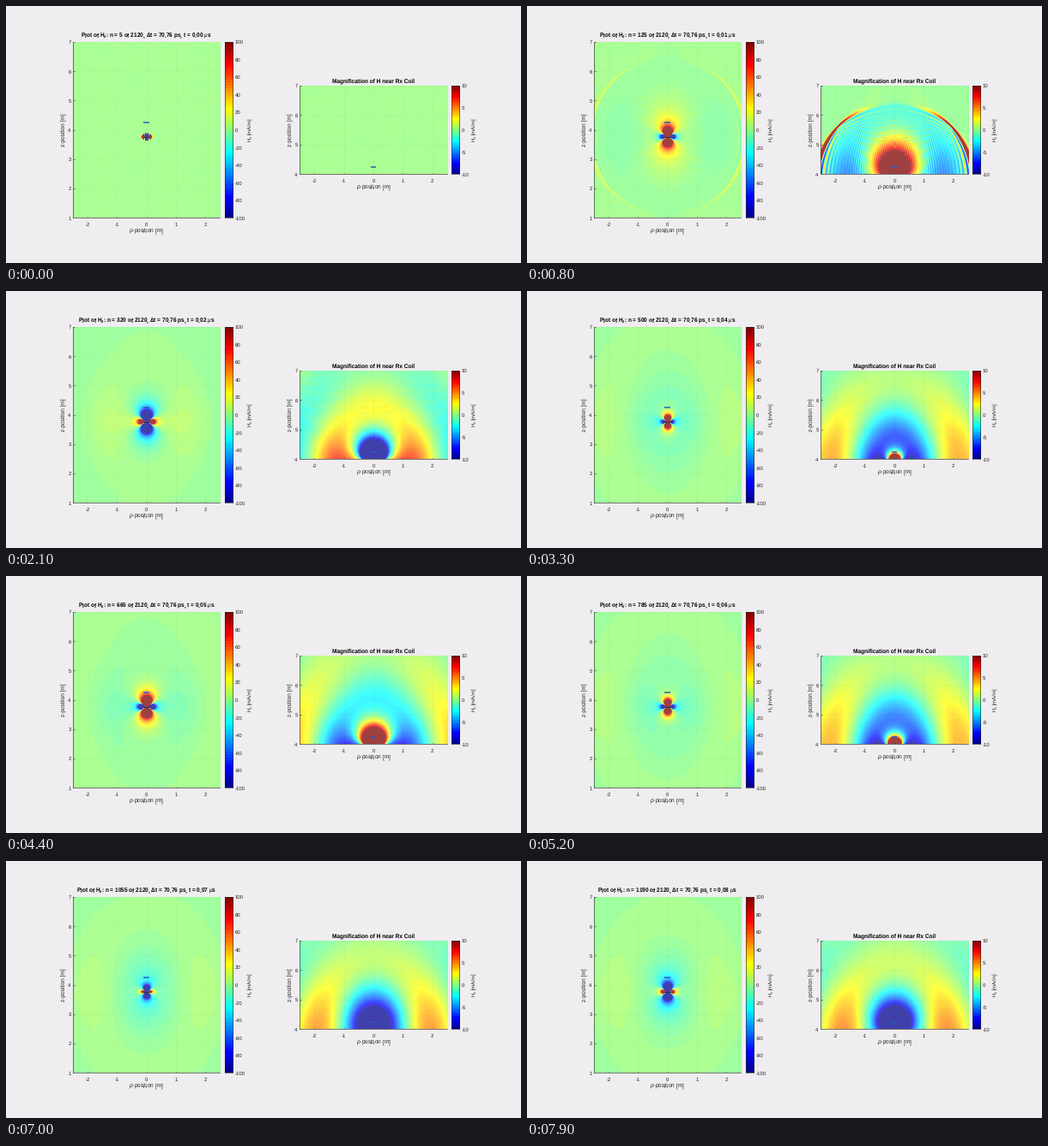
A matplotlib script for the animation above (8000 ms loop, 600 px wide and 300 px high).

```python
import numpy as np
import matplotlib.pyplot as plt
from matplotlib.animation import FuncAnimation
from matplotlib.colors import ListedColormap
from matplotlib.lines import Line2D

W, H, DPI = 600, 300, 100
FRAMES, INTERVAL = 80, 100
FIRST, STRIDE, TOTAL = 5, 15, 2120

plt.rcParams.update({
    "font.family": "Liberation Sans",
    "mathtext.fontset": "custom",
    "mathtext.rm": "Liberation Sans",
    "mathtext.it": "Liberation Sans:italic",
    "mathtext.bf": "Liberation Sans:bold",
    "mathtext.default": "regular",
    "text.hinting": "no_hinting",
    "axes.unicode_minus": False,
})

# Axisymmetric FDTD of a small loop antenna (E_phi, H_rho, H_z)
DX = 0.03
DT = 70.76e-12
S = 0.9995 / np.sqrt(2)
FREQ = 100e6
CURRENT = 2500.0            # mA
LOOP, TX_Z, RX_Z = 2, 3.75, 4.25
NR, BELOW, ABOVE, PAD = 84, 92, 109, 60


def simulate():
    nr, nz = NR + PAD, BELOW + ABOVE + 1 + 2 * PAD
    j0 = PAD + BELOW
    i, j = np.arange(nr + 1.0), np.arange(nz + 0.0)

    def sponge(i, j):
        di = np.clip((i - NR) / PAD, 0, None)
        dj = np.clip(np.maximum(PAD - j, j - (nz - 1 - PAD)) / PAD, 0, None)
        return np.exp(-0.22 * (di[:, None] ** 3 + dj[None, :] ** 3))

    e = np.zeros((nr + 1, nz))
    hz = np.zeros((nr, nz))
    hr = np.zeros((nr + 1, nz - 1))
    de, dz, dr = sponge(i, j), sponge(i[:-1] + .5, j), sponge(i, j[:-1] + .5)
    rho = i[:, None]
    mid = S / (rho[:-1] + 0.5)
    shots = []
    for n in range(FIRST + STRIDE * (FRAMES - 1)):
        e[1:-1, 1:-1] += S * (np.diff(hr[1:-1], axis=1)
                              - np.diff(hz[:, 1:-1], axis=0))
        drive = CURRENT * np.sin(2 * np.pi * FREQ * (n + 0.5) * DT)
        e[LOOP, j0] += S * drive / DX
        e *= de
        hz -= mid * np.diff(rho * e, axis=0)
        hz *= dz
        hr += S * np.diff(e, axis=1)
        hr *= dr
        if (n + 1 - FIRST) % STRIDE == 0:
            half = hz[:NR, PAD:nz - PAD].T
            shots.append(np.hstack([half[:, ::-1], half]))
    return shots


def jet(levels=64):
    k = np.arange(1, levels + 1)
    ramp = [np.minimum(k - a, b - k) / 16 for a, b in
            ((24, 72), (8, 56), (-8, 40))]
    return ListedColormap(np.clip(np.transpose(ramp), 0, 1))


fields = simulate()

fig = plt.figure(figsize=(W / DPI, H / DPI), dpi=DPI, facecolor="#efedef")
JET = jet()
INK = "#262626"
SMALL, LARGE = 5.95, 6.55


def pt(px):
    return px * 72 / DPI


def label(x, y, s, size=SMALL, **kw):
    kw = {"ha": "center", "va": "baseline", "color": INK, **kw}
    return fig.text(x / W, 1 - y / H, s, fontsize=pt(size), **kw)


def box(x0, y0, x1, y1):
    ax = fig.add_axes([x0 / W, 1 - y1 / H, (x1 - x0) / W, (y1 - y0) / H])
    ax.set_xticks([])
    ax.set_yticks([])
    for spine in ax.spines.values():
        spine.set(linewidth=pt(0.6), color=INK)
    return ax


def panel(x0, y0, x1, y1, z0, limit, coils):
    ax = box(x0, y0, x1, y1)
    ax.spines[["top", "right"]].set_visible(False)
    r = NR * DX
    img = ax.imshow(
        fields[0], cmap=JET, vmin=-limit, vmax=limit, alpha=0.75,
        origin="lower", aspect="auto", interpolation="bilinear",
        interpolation_stage="data",
        extent=(-r, r, TX_Z - (BELOW + .5) * DX, TX_Z + (ABOVE + .5) * DX))
    ax.set(xlim=(-2.5, 2.5), ylim=(z0, 7))

    ppm = (x1 - x0) / 5
    cx = (x0 + x1) / 2
    grid = dict(color=INK, alpha=0.035, lw=pt(0.8))
    for x in range(-2, 3):
        ax.axvline(x, **grid)
        ax.plot([x, x], [z0, z0 + 0.05], color=INK, lw=pt(0.5))
        label(cx + x * ppm, y1 + 9.4, str(x))
    for z in range(z0, 8):
        y = y1 - (z - z0) * (y1 - y0) / (7 - z0)
        ax.axhline(z, **grid)
        ax.plot([-2.5, -2.45], [z, z], color=INK, lw=pt(0.5))
        label(x0 - 2.3, y + 2.3, str(z), ha="right")
    for z, color, width in coils:
        ax.plot([-0.1, 0.1], [z, z], color=color, lw=pt(width),
                solid_capstyle="butt")
    label(cx, y1 + 17.3, r"$\mathit{ρ}$-position [m]", LARGE)
    label(x0 - 10.8, (y0 + y1) / 2, "z-position [m]", LARGE,
          rotation=90, va="center")
    return img


def colorbar(x0, y0, x1, y1, limit, step, label_x):
    ax = box(x0, y0, x1, y1)
    ax.imshow(np.arange(64)[:, None], cmap=JET, origin="lower",
              aspect="auto", interpolation="nearest")
    for v in range(-limit, limit + 1, step):
        y = y1 - (v + limit) / (2 * limit) * (y1 - y0)
        label(x1 + 2.6, y + 2.2, str(v), ha="left")
    label(label_x, (y0 + y1) / 2, "H$_z$ [mA/m]", SMALL,
          rotation=90, va="center")


RX = (RX_Z, "#1f5fc8", 1.5)
TX = (TX_Z, "#2c2c3c", 0.9)
main = panel(78, 42, 249.3, 247.4, 1, 100, [RX, TX])
zoom = panel(342, 93, 514, 196.4, 4, 10, [RX])
colorbar(254.7, 42, 264.3, 247.4, 100, 20, 284.5)
colorbar(519, 93, 528.3, 196.4, 10, 5, 545.5)

title = label(163.7, 36.3, "", LARGE, weight="bold", color="black")
label(428.5, 90, "Magnification of H near Rx Coil", LARGE, weight="bold",
      color="black")
fig.add_artist(Line2D([0, 1], [0.5 / H] * 2, color="#505050", lw=pt(1)))


def update(k):
    n = FIRST + STRIDE * k
    main.set_data(fields[k])
    zoom.set_data(fields[k])
    title.set_text(f"Plot of H$_z$: n = {n} of {TOTAL}, Δt = {DT * 1e12:.2f} ps,"
                   f" t = {n * DT * 1e6:.2f} $\\mathit{{μ}}$s")
    return main, zoom, title


anim = FuncAnimation(fig, update, frames=FRAMES, interval=INTERVAL,
                     repeat=True, repeat_delay=0, blit=False)
plt.show()
```
